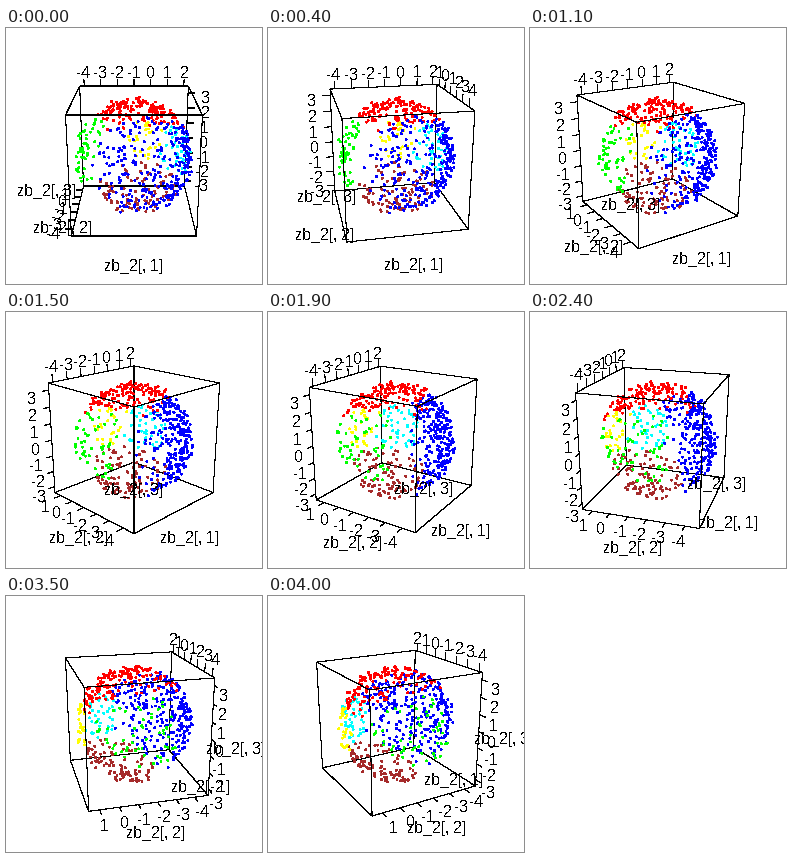
Animation of 256x256 px, one loop 4.1 s. Source, as a matplotlib script:

```python
import itertools

import matplotlib.pyplot as plt
import numpy as np
from matplotlib.animation import FuncAnimation
from matplotlib.collections import LineCollection

plt.rcParams["text.hinting"] = "native"
plt.rcParams["text.hinting_factor"] = 1

SIZE, DPI = 256, 64
PX = 72 / DPI                      # points per pixel
HAIRLINE = 0.05 * PX               # unsmoothed strokes widen to a full pixel
FRAMES, STEP = 41, 3               # degrees turned per frame
FOCAL, DIST = 493, 8.48
TILT = np.radians(20)
TICK, GAP, TITLE = 2 / 15, 1 / 3, 1.285

# Axis value = centre + half * box coordinate, box is (x, up, front).
X_VALS = np.arange(-4, 3)
Y_VALS = np.arange(-4, 2)
Z_VALS = np.arange(-3, 4)
X_POS = (X_VALS + 1) / 3.27
Y_POS = -(Y_VALS + 1.6) / 3.15
Z_POS = Z_VALS / 3.4

# colour, centre of the patch, angular radius, count
PATCHES = [
    ("#ff0000", (0.08, 0.92, -0.15), 56, 140),
    ("#0000ff", (0.52, 0.1, 0.83), 69, 265),
    ("#a52a2a", (0.12, -0.92, -0.3), 46, 95),
    ("#00ff00", (-0.95, 0.2, -0.2), 42, 55),
    ("#ffff00", (0.28, 0.0, -0.95), 24, 26),
    ("#00ffff", (0.8, -0.06, -0.52), 29, 42),
]


def make_cloud():
    """Scatter points on a sphere, each patch keeping to its own area."""
    rng = np.random.default_rng(12)
    raw = rng.normal(size=(9000, 3))
    raw /= np.linalg.norm(raw, axis=1, keepdims=True)
    centres = np.array([p[1] for p in PATCHES])
    centres /= np.linalg.norm(centres, axis=1, keepdims=True)
    radii = np.radians([p[2] for p in PATCHES])
    reach = np.arccos(np.clip(raw @ centres.T, -1, 1)) / radii
    reach += rng.normal(0, 0.06, reach.shape)
    owner = np.where(reach.min(axis=1) < 1, reach.argmin(axis=1), -1)
    spots, colors = [], []
    for i, (color, _, _, count) in enumerate(PATCHES):
        chosen = raw[owner == i][:count]
        spots.append(chosen * rng.uniform(0.87, 1.02, (len(chosen), 1)))
        colors += [color] * len(chosen)
    return np.vstack(spots), np.array(colors)


def project(pts, angle):
    """Return pixel positions and nearness to the eye."""
    x, y, z = np.asarray(pts, float).T
    c, s = np.cos(angle), np.sin(angle)
    x, z = x * c + z * s, z * c - x * s
    c, s = np.cos(TILT), np.sin(TILT)
    y, z = y * c - z * s, y * s + z * c
    scale = FOCAL / (DIST - z)
    return np.column_stack([128 + x * scale, 128 - y * scale]), z


def along(axis, values, fixed):
    """Points on a box edge: `values` on one axis, `fixed` on the others."""
    pts = np.tile(np.array(fixed, float), (len(values), 1))
    pts[:, axis] = values
    return pts


def axis_layout(frame):
    """Edge points and outward direction of the three axes."""
    deg = frame * STEP
    up, left, right = (0, 1, 0), (-1, 0, 0), (1, 0, 0)
    back = -1 if deg <= 90 else 1
    x_axis = along(0, X_POS, (0, 1, back)), up
    if 0 < deg < 21.3:
        y_axis = along(2, Y_POS, (1, 1, 0)), up
    else:
        y_axis = along(2, Y_POS, (-1, -1, 0)), left
    if deg == 0:
        z_axis = along(1, Z_POS, (1, 0, -1)), right
    else:
        z_axis = along(1, Z_POS, (-1, 0, back)), left
    return x_axis, y_axis, z_axis


corners = np.array(list(itertools.product((-1, 1), repeat=3)))
edges = [(a, b) for a, b in itertools.combinations(range(8), 2)
         if np.abs(corners[a] - corners[b]).sum() == 2]
titles = np.array([(0, -TITLE, TITLE), (-TITLE, -TITLE, 0), (-TITLE, 0, TITLE)])
cloud, cloud_colors = make_cloud()

fig = plt.figure(figsize=(SIZE / DPI, SIZE / DPI), dpi=DPI, facecolor="white")
ax = fig.add_axes([0, 0, 1, 1])
ax.set_xlim(0, SIZE)
ax.set_ylim(SIZE, 0)
ax.axis("off")


def add_lines(zorder):
    lines = LineCollection([], colors="black", linewidths=HAIRLINE,
                           antialiaseds=False, zorder=zorder)
    return ax.add_collection(lines, autolim=False)


def add_text(label):
    return ax.text(0, 0, label, family="Liberation Sans", fontsize=16 * PX,
                   ha="center", va="baseline", antialiased=False, zorder=5)


far_lines, near_lines, ticks = add_lines(1), add_lines(3), add_lines(1)
dots = ax.scatter(cloud[:, 0], cloud[:, 1], s=(2 * PX) ** 2, linewidths=0,
                  antialiaseds=False, zorder=2)
labels = [add_text(str(v)) for v in (*X_VALS, *Y_VALS, *Z_VALS)]
labels += [add_text(f"zb_2[, {i}]") for i in (1, 2, 3)]


def draw(frame):
    angle = np.radians(frame * STEP)

    pos, near = project(corners, angle)
    front = near.argmax()
    far_lines.set_segments([pos[list(e)] for e in edges if front not in e])
    near_lines.set_segments([pos[list(e)] for e in edges if front in e])

    pos, near = project(cloud, angle)
    order = near.argsort()
    dots.set_offsets(pos[order])
    dots.set_facecolor(cloud_colors[order])

    marks, anchors = [], []
    for pts, out in axis_layout(frame):
        out = np.array(out)
        start, _ = project(pts, angle)
        end, _ = project(pts + TICK * out, angle)
        marks += list(np.stack([start, end], axis=1))
        anchors.append(pts + GAP * out)
    ticks.set_segments(marks)

    pos, _ = project(np.vstack([*anchors, titles]), angle)
    for text, (x, y) in zip(labels, pos):
        text.set_position((x, y + 10))
    return [far_lines, near_lines, ticks, dots, *labels]


anim = FuncAnimation(fig, draw, frames=FRAMES, interval=100, repeat=True,
                     repeat_delay=0, blit=False)
plt.show()
```
